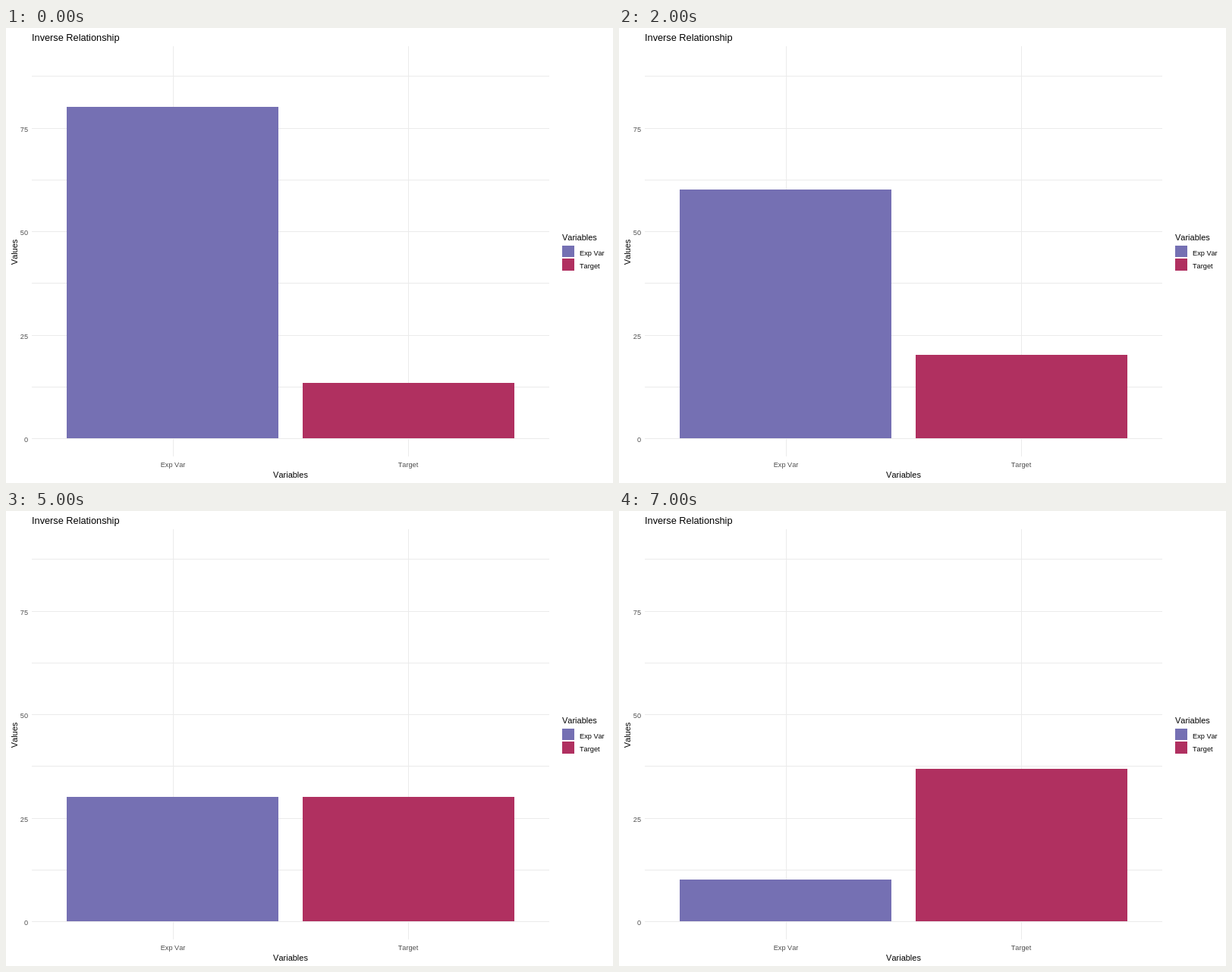
An HTML page with a canvas for the animation above (8 s loop, 800 px wide and 600 px high).

```html
<!DOCTYPE html>
<html lang="en">
<head>
<meta charset="utf-8">
<title>Inverse Relationship</title>
<style>
  html, body { margin: 0; width: 100%; height: 100%; overflow: hidden; background: #fff; }
  canvas { display: block; font-kerning: none; }
</style>
</head>
<body>
<canvas id="chart" width="800" height="600"></canvas>
<script>
const ctx = document.getElementById("chart").getContext("2d");
const STEP_MS = 1000, STEPS = 8;
const BASE_Y = 541;
const VIOLET = "#7570b3", MAROON = "#b03060", GRID = "#ebebeb", GREY = "#4d4d4d";

const bars = [
  { name: "Exp Var", x: 80, mid: 220, color: VIOLET, top: 103.8, rise: 54.6 },
  { name: "Target", x: 391, mid: 530, color: MAROON, top: 467.8, rise: -18.2 }
];

function rect(x, y, w, h, color) {
  ctx.fillStyle = color;
  ctx.fillRect(x, y, w, h);
}

function label(text, x, y, size, color = "#000", align = "left") {
  ctx.font = `${size}px "Liberation Sans", Arial, sans-serif`;
  ctx.fontKerning = "none";
  ctx.textAlign = align;
  ctx.fillStyle = color;
  ctx.fillText(text, x, y);
}

function drawGrid() {
  for (let i = 0; i < 8; i++) {
    const y = Math.round(BASE_Y - i * 68.25);
    rect(34, y, 682, 1, GRID);
    if (i % 2 === 0) label(String(i * 12.5), 29, y + 4.5, 9.2, GREY, "right");
  }
  for (const bar of bars) rect(bar.mid, 24, 1, 541, GRID);
}

function drawText() {
  label("Inverse Relationship", 34, 17, 12.75);
  label("Variables", 375, 593, 11, "#000", "center");
  ctx.save();
  ctx.translate(15, 295.5);
  ctx.rotate(-Math.PI / 2);
  label("Values", 0, 0, 11, "#000", "center");
  ctx.restore();
}

function drawLegend() {
  label("Variables", 733, 280, 11);
  rect(733, 287, 16, 15, VIOLET);
  rect(733, 304, 16, 16, MAROON);
  bars.forEach((bar, i) => label(bar.name, 756, 300 + i * 17, 9.2));
}

function draw(step) {
  rect(0, 0, 800, 600, "#fff");
  drawGrid();
  for (const bar of bars) {
    const y = Math.round(bar.top + bar.rise * step);
    rect(bar.x, y, 279, BASE_Y - y, bar.color);
    label(bar.name, bar.mid, 579, 9.2, GREY, "center");
  }
  drawText();
  drawLegend();
}

let start;
function tick(now) {
  start ??= now;
  draw(Math.floor((now - start) / STEP_MS) % STEPS);
  requestAnimationFrame(tick);
}
draw(0);
requestAnimationFrame(tick);
</script>
</body>
</html>
```
